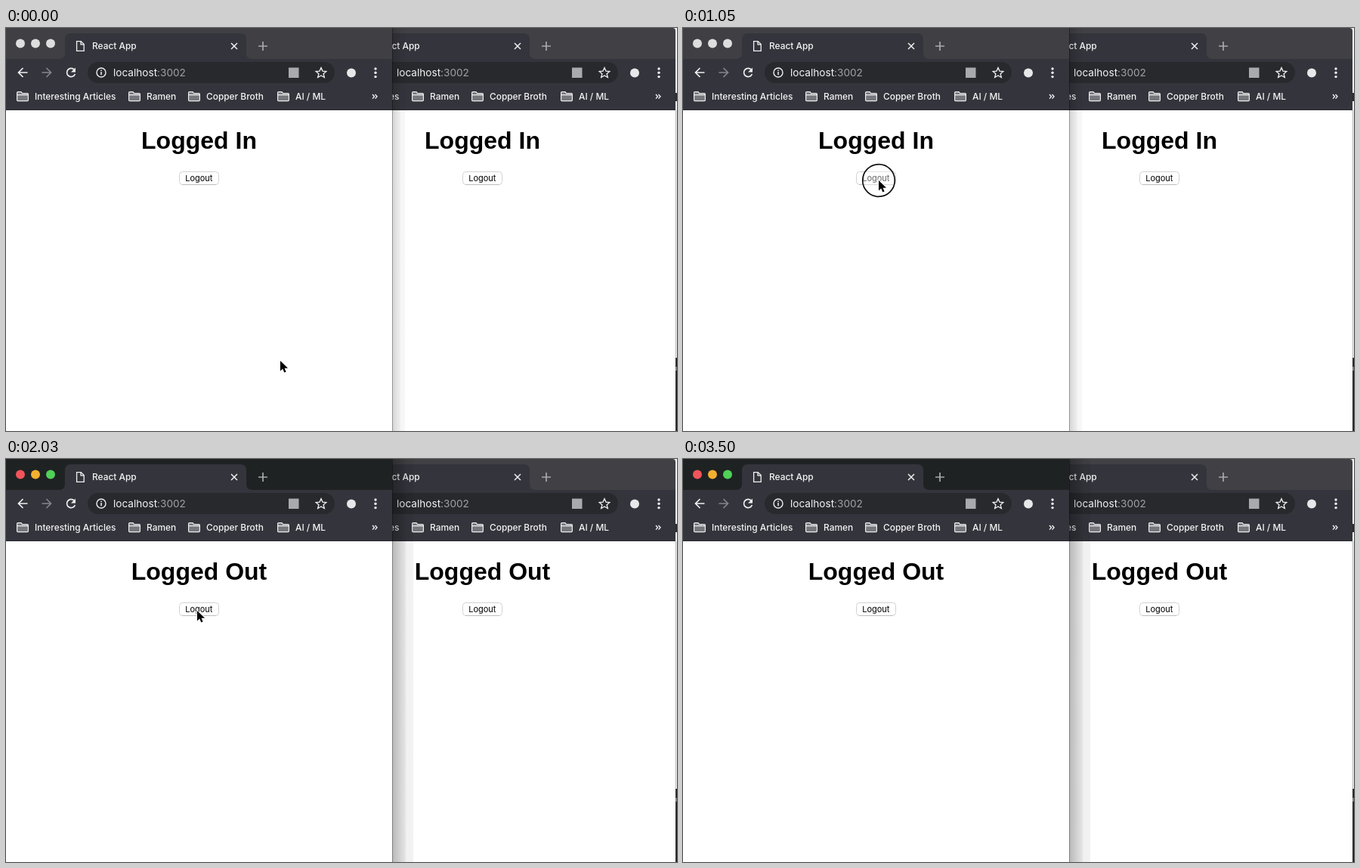
These frames come from a looping animation (888x534 px, 3.57 s). An HTML page:

```html
<!DOCTYPE html>
<html lang="en">
<head>
<meta charset="utf-8">
<style>
  html, body { margin: 0; width: 100%; height: 100%; overflow: hidden; background: #fff; }
  svg { display: block; }
  text { font: 500 11.9px Inter, sans-serif; fill: #f4f4f5; white-space: pre; }
  .url { font-size: 13.6px; font-weight: 400; }
  .heading { font: bold 32px "Liberation Sans", Arial, sans-serif; fill: #000; text-anchor: middle; }
  .label { font-size: 11px; font-weight: 400; fill: #000; text-anchor: middle; }
  .line { fill: none; stroke: #f0f0f1; stroke-width: 1.7; }
  .bar { fill: var(--bar); }
</style>
</head>
<body>
<svg width="888" height="534" viewBox="0 0 888 534">
  <defs>
    <linearGradient id="fade">
      <stop stop-opacity=".28"/>
      <stop offset=".64" stop-opacity=".1"/>
      <stop offset=".64" stop-opacity=".06"/>
      <stop offset="1" stop-opacity=".05"/>
    </linearGradient>
    <g id="folder" fill="#76767c" stroke="#eeeeef" stroke-width="1.2">
      <path d="M.6 11.4V1.8q0-1.2 1.2-1.2H6l1.6 2h6.6q1.2 0 1.2 1.2v7.6q0 1.2-1.2 1.2H1.8q-1.2 0-1.2-1.2zM.6 4.6h14.8"/>
    </g>
    <g id="browser">
      <path fill="#fff" d="M0 0h511v534H0z"/>
      <path class="bar" d="M0 0h511v42H0z"/>
      <path fill="#34343c" d="M0 41h70q8 0 8-8V15q0-8 8-8h224q8 0 8 8v18q0 8 8 8h185v68H0z"/>
      <path fill="#2a2a31" d="M0 108h511v1H0z"/>
      <path class="line" stroke-width="1.3" style="stroke-width:1.3" d="M93.6 17.6h5.6l4 4v8.8h-9.6zM99 17.8v4h4"/>
      <text x="114" y="28">React App</text>
      <path class="line" style="stroke-width:1.5" d="M298 20l8 8m0-8l-8 8"/>
      <path class="line" style="stroke:#a9a8ac" d="M334 24h12m-6-6v12"/>

      <rect x="108" y="45" width="327" height="28" rx="14" fill="#28292d"/>
      <path id="arrow" class="line" d="M28.5 59H16.5m6-6l-6 6 6 6"/>
      <path class="line" style="stroke:#85858b" d="M47.5 59h12m-6-6l6 6-6 6"/>
      <path class="line" d="M90.5 55.5A5.6 5.6 0 1 0 91.4 61"/>
      <path fill="#f0f0f1" d="M92 52.5v6h-6z"/>
      <circle class="line" style="stroke-width:1.4" cx="126" cy="59" r="6"/>
      <path class="line" style="stroke-width:1.5" d="M126 58v4.2m0-6.8v1.5"/>
      <text class="url" x="142" y="64">localhost<tspan fill="#a0a1a5">:3002</tspan></text>
      <rect x="374" y="52.5" width="13.5" height="13.5" fill="#a9aaad"/>
      <path class="line" style="stroke-width:1.3" d="M417 52.6l2 4.5 4.8.4-3.7 3.2 1.2 4.8-4.3-2.6-4.3 2.6 1.2-4.8-3.7-3.2 4.8-.4z"/>
      <circle cx="457" cy="59.5" r="6" fill="#e8e8ea"/>
      <g fill="#f0f0f1">
        <circle cx="489" cy="54" r="1.7"/><circle cx="489" cy="59.3" r="1.7"/><circle cx="489" cy="64.6" r="1.7"/>
      </g>

      <use href="#folder" x="14" y="84"/><text x="38" y="95">Interesting Articles</text>
      <use href="#folder" x="162" y="84"/><text x="186" y="95">Ramen</text>
      <use href="#folder" x="241" y="84"/><text x="265" y="95">Copper Broth</text>
      <use href="#folder" x="359" y="84"/><text x="383" y="95">AI / ML</text>
      <path class="line" style="stroke-width:1.4" d="M485 88l2.5 2.8-2.5 2.8m3.5-5.6l2.5 2.8-2.5 2.8"/>

      <text id="heading" class="heading" x="255.5" y="160">Logged In</text>
      <rect x="229.5" y="190.5" width="52" height="17" rx="4" fill="#fff" stroke="#d2d2d2"/>
      <path d="M233 207.6h45" stroke="#b8b8b8" stroke-width=".8"/>
      <text class="label" x="255.3" y="203">Logout</text>
    </g>
  </defs>

  <path fill="#f1f1f1" d="M880 0h8v534h-8z"/>
  <path fill="#2b2b2e" d="M886 86h2v11h-2zM886 437h2v97h-2z"/>
  <path fill="#77777a" d="M886 449h2v5h-2z"/>
  <use href="#browser" x="375" style="--bar:#414044"/>
  <path d="M886.5 109v328" stroke="#b5b5b5"/>
  <path fill="#e4e4e4" d="M882 0h4v4q0-4-4-4z"/>

  <rect id="shadow" x="511" height="534" fill="url(#fade)"/>
  <use id="front" href="#browser"/>
  <path d="M511.5 0v534" stroke="#000" stroke-opacity=".3"/>
  <g id="lights">
    <circle cx="19" cy="20.5" r="6"/><circle cx="39" cy="20.5" r="6"/><circle cx="59" cy="20.5" r="6"/>
  </g>
  <g id="pointer">
    <circle id="ring" r="21.3" fill="#fff" fill-opacity=".4" stroke="#111" stroke-width="1.7"/>
    <path d="M0 0v13.6l3.2-3 2.1 5 2.3-1-2.1-4.8H10z" stroke="#fff" stroke-width="1.6" paint-order="stroke"/>
  </g>
</svg>
<script>
  const LOOP = 3570, STEP = 70;
  const ACTIVATE = 1120, LOGOUT = 1960;
  const clicks = [[910, 1190], [1890, 2030]];
  // time, x, y
  const path = [
    [0, 363, 441], [70, 357, 400], [140, 342, 342], [210, 342, 342],
    [420, 283, 206], [490, 272, 204], [700, 259, 202], [1330, 259, 202],
    [1680, 253, 201], [2940, 253, 201], [3220, 320, 325], [3500, 460, 540]
  ];
  const get = id => document.getElementById(id);
  const [heading, shadow, front, lights, pointer, ring] =
    ["heading", "shadow", "front", "lights", "pointer", "ring"].map(get);

  function pointerAt(t) {
    const next = path.findIndex(key => key[0] > t);
    if (next < 0) return path.at(-1).slice(1);
    const [t0, x0, y0] = path[next - 1], [t1, x1, y1] = path[next];
    const k = (t - t0) / (t1 - t0);
    return [x0 + (x1 - x0) * k, y0 + (y1 - y0) * k];
  }

  function draw(now) {
    const t = Math.floor(now % LOOP / STEP) * STEP;
    const active = t >= ACTIVATE;
    const title = t >= LOGOUT ? "Logged Out" : "Logged In";
    if (heading.textContent !== title) heading.textContent = title;
    front.style.setProperty("--bar", active ? "#1f2223" : "#403f43");
    shadow.setAttribute("width", active ? 28 : 17);
    shadow.setAttribute("opacity", active ? 1 : .6);
    ["#f2545b", "#f4b030", "#50d157"].forEach((color, i) =>
      lights.children[i].setAttribute("fill", active ? color : "#dedede"));
    pointer.setAttribute("transform", `translate(${pointerAt(t)})`);
    const pressed = clicks.some(([down, up]) => t >= down && t < up);
    ring.setAttribute("visibility", pressed ? "visible" : "hidden");
    requestAnimationFrame(draw);
  }
  draw(0);
</script>
</body>
</html>
```
